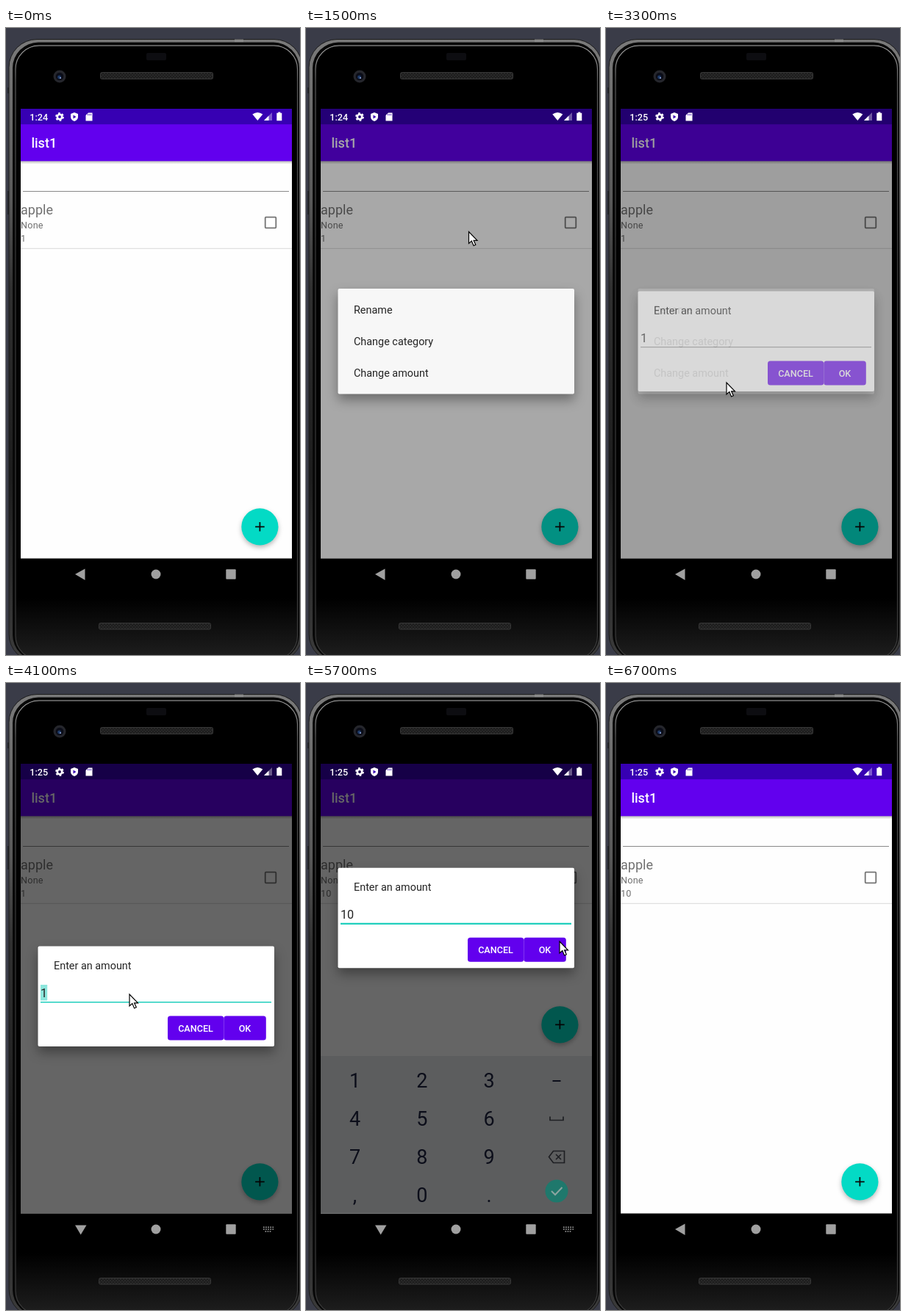
An HTML page for the animation above (7100 ms loop, 400 by 854 pixels).

```html
<!DOCTYPE html>
<html lang="en">
<head>
<meta charset="utf-8">
<title>Shopping list</title>
<style>
html, body { margin: 0; width: 100%; height: 100%; overflow: hidden; background: #3a3c48; }
svg { display: block; width: 400px; height: 854px; font-family: Roboto, sans-serif; }
.medium { font-weight: 500; }
.small { font-size: 12.6px; }
.body { font-size: 14.4px; fill: #242424; }
.card { filter: drop-shadow(0 8px 8px rgba(0,0,0,.36)); }
</style>
</head>
<body>
<svg viewBox="0 0 400 854">
  <defs>
    <linearGradient id="rim" x1="0" x2="0" y1="0" y2="1">
      <stop offset="0" stop-color="#7a7a7a"/><stop offset=".26" stop-color="#585858"/>
      <stop offset=".4" stop-color="#303030"/><stop offset=".7" stop-color="#1c1c1c"/><stop offset="1" stop-color="#3c3c3c"/>
    </linearGradient>
    <linearGradient id="edge" x1="0" x2="0" y1="0" y2="1">
      <stop offset="0" stop-color="#b0b0b0"/><stop offset=".06" stop-color="#5a5a5a"/>
      <stop offset=".35" stop-color="#3a3a3a"/><stop offset="1" stop-color="#3a3a3a"/>
    </linearGradient>
    <linearGradient id="glass" x1="0" x2="0" y1="0" y2="1">
      <stop offset=".9" stop-color="#000"/><stop offset="1" stop-color="#1f1f1f"/>
    </linearGradient>
    <linearGradient id="barShadow" x1="0" x2="0" y1="0" y2="1">
      <stop offset="0" stop-opacity=".28"/><stop offset="1" stop-opacity="0"/>
    </linearGradient>
    <pattern id="mesh" width="4" height="4" patternUnits="userSpaceOnUse">
      <rect width="4" height="4" fill="#1d1d1d"/><path d="M0 0L4 4M4 0L0 4" stroke="#2c2c2c" stroke-width=".8"/>
    </pattern>
    <clipPath id="screen"><rect x="20" y="110" width="369" height="612.6"/></clipPath>
    <clipPath id="rowClip"><rect x="20" y="230" width="369" height="70.5"/></clipPath>
  </defs>

  <!-- phone body -->
  <rect width="400" height="854" fill="#3a3c48"/>
  <path d="M2 81h6v8H2zM2 245h6v9H2zM2 222h3v24H2z" fill="#25262c"/>
  <rect x="4" y="15.5" width="399" height="848" rx="38" fill="url(#rim)" stroke="#1c1c1c"/>
  <path d="M311 15.5h12v4h-12z" fill="#8a8a8a"/>
  <rect x="9" y="19.5" width="390" height="842" rx="35" fill="#080808"/>
  <rect x="13" y="24" width="383.5" height="836" rx="32" fill="url(#glass)" stroke="url(#edge)" stroke-width="1.2"/>
  <rect x="191" y="34" width="27" height="10" rx="2" fill="#0d0d11"/>
  <circle cx="73" cy="66" r="8.5" fill="#25262c"/>
  <circle cx="73" cy="66" r="5.3" fill="#0b0d18"/>
  <circle cx="72.5" cy="67" r="2.4" fill="#1e3a68"/>
  <circle cx="74" cy="68" r="1.1" fill="#8fa6d8"/>
  <g fill="url(#mesh)" stroke="#383838">
    <rect x="128.5" y="60.5" width="153" height="9" rx="2"/>
    <rect x="126.5" y="810.5" width="152" height="8.5" rx="2"/>
  </g>

  <g clip-path="url(#screen)">
    <rect x="20" y="110" width="369" height="613" fill="#fefefe"/>
    <rect x="20" y="181" width="369" height="4.5" fill="url(#barShadow)"/>
    <rect x="20" y="131" width="369" height="50.3" fill="#6200ee"/>
    <rect x="20" y="110" width="369" height="21.2" fill="#3700b3"/>
    <text x="34.4" y="163.3" class="medium" font-size="18" fill="#fff">list1</text>
    <path d="M23 222.5H385" stroke="#898989"/>

    <g clip-path="url(#rowClip)"><circle id="ripple" cx="222" cy="278" fill="#dedede"/></g>
    <g fill="#707070">
      <text x="20" y="254" font-size="18">apple</text>
      <g class="small" letter-spacing=".23"><text x="20" y="273">None</text><text id="amount" x="20" y="291"></text></g>
    </g>
    <rect x="352.7" y="257.7" width="14.6" height="14.6" rx="1" fill="none" stroke="#747474" stroke-width="1.8"/>
    <path d="M20 300.3H389" stroke="#d9d9d9"/>

    <g id="fab">
      <circle cx="345.4" cy="679.4" r="25.1" fill="#03dac5" style="filter:drop-shadow(0 3px 3px rgba(0,0,0,.28))"/>
      <path d="M339.1 679.3h12.6M345.4 673v12.6" stroke="#0a0a0a" stroke-width="1.8"/>
    </g>
    <rect id="dim" x="20" y="110" width="369" height="613"/>

    <!-- status icons -->
    <g fill="#fff">
      <text id="clock" x="32.3" y="125.7" class="medium small"></text>
      <circle cx="73" cy="121" r="3.2" fill="none" stroke="#fff" stroke-width="2.6"/>
      <circle cx="73" cy="121" r="5" fill="none" stroke="#fff" stroke-width="1.8" stroke-dasharray="2.7 2.536"/>
      <path d="M93 115l5 2v4q0 4-5 6q-5-2-5-6v-4z"/>
      <path d="M91.5 118.5v5l4-2.5z" fill="#3700b3"/>
      <path d="M112 115.5h5.5v11h-9v-7.5z"/>
      <path d="M111.5 117v2.2M113.5 117v2.2M115.5 117v2.2" stroke="#3700b3" stroke-width=".8"/>
      <path d="M335.3 117.5q7-5 14 0l-7 8.5z"/>
      <path d="M362 115v11h-11z" opacity=".35"/><path d="M357.5 119.5v6.5H351z"/>
      <path d="M370.3 114.5h3v1.3h2v10.5h-7v-10.5h2z"/>
    </g>

    <g id="menu">
      <rect class="card" x="43.5" y="355" width="321.5" height="143.5" rx="2" fill="#f7f7f7"/>
      <rect id="choice" x="43.5" y="448.5" width="321.5" height="43" fill="#dedede"/>
      <g class="body"><text x="65" y="389">Rename</text><text x="65" y="432">Change category</text><text x="65" y="475">Change amount</text></g>
    </g>

    <g id="prompt">
      <rect class="card" x="43.5" y="358.5" width="321.5" height="136.5" rx="2" fill="#fff"/>
      <text x="65" y="390" class="body">Enter an amount</text>
      <rect id="selection" x="47" y="411" width="9.2" height="21.5" fill="#8de7dd"/>
      <text id="entry" x="47" y="427.5" font-size="16.2" fill="#242424"></text>
      <path id="underline" d="M47 434.7H361"/>
      <g fill="#6200ee"><rect x="220" y="453.5" width="76.3" height="33" rx="3.5"/><rect x="296.3" y="453.5" width="57.5" height="33" rx="3.5"/></g>
      <g class="medium small" fill="#fff" text-anchor="middle"><text x="258" y="474.6">CANCEL</text><text x="325" y="474.6">OK</text></g>
    </g>

    <g id="keyboard">
      <rect x="20" y="508" width="369" height="215" fill="#e8eaed"/>
      <g id="keys" font-size="27" fill="#1d2240" text-anchor="middle"></g>
      <g fill="none" stroke="#4b4e58" stroke-width="1.7">
        <path d="M335.5 542h11" stroke="#1d2240" stroke-width="2.2"/>
        <path d="M332 590.5v5h18v-5"/>
        <path d="M330.5 645.5l6-8h15v16h-15zM340 642l7 7M347 642l-7 7"/>
      </g>
      <rect id="keyShade" x="20" y="508" width="369" height="215"/>
      <circle id="done" cx="341" cy="692" r="15.5"/>
      <path id="tick" d="M334 692l5 5 9.5-10" fill="none" stroke-width="2"/>
    </g>
  </g>

  <!-- navigation bar -->
  <g fill="#a0a0a0">
    <path id="back"/>
    <circle cx="204" cy="744" r="6.5"/><rect x="299.3" y="737.3" width="13.4" height="13.4" rx="1"/>
    <path id="switcher" d="M350 741.2h14M350 744h14M352.5 747h9" stroke="#a2a2a2" stroke-width="1.6" stroke-dasharray="1.7 1.4"/>
  </g>
  <path id="cursor" d="M0 0V16L3.8 12.6 6.6 19 9.3 17.8 6.6 11.8H11.5Z" fill="#fff" stroke="#000" stroke-width="1.2"/>
</svg>

<script>
const LOOP = 7100, STEP = 100;
const el = Object.fromEntries([...document.querySelectorAll('svg [id]')].map(node => [node.id, node]));
const set = (node, attrs) => { for (const key in attrs) node.setAttribute(key, attrs[key]); };
const show = (node, visible) => set(node, { visibility: visible ? 'visible' : 'hidden' });
const shift = (node, x, y) => set(node, { transform: `translate(${x} ${y})` });

// Linear interpolation through [time, value] stops.
function track(t, ...stops) {
  if (t <= stops[0][0]) return stops[0][1];
  for (let i = 1; i < stops.length; i++) {
    const [t0, a] = stops[i - 1], [t1, b] = stops[i];
    if (t <= t1) return a + (b - a) * (t - t0) / (t1 - t0);
  }
  return stops[stops.length - 1][1];
}

const pointer = [
  [100, 392, 836], [600, 221.5, 277.5], [1500, 221.5, 277.5], [1700, 170, 403], [2300, 170, 403],
  [2700, 164, 483], [3300, 164, 483], [3700, 168, 424], [4500, 168, 424], [4700, 66, 540],
  [4850, 66, 540], [5000, 158, 694], [5150, 158, 694], [5400, 345, 352], [5700, 345, 352], [6000, 402, 500]
];

['123', '456', '789', ',0.'].forEach((row, r) => [...row].forEach((label, c) => {
  const key = document.createElementNS('http://www.w3.org/2000/svg', 'text');
  set(key, { x: 66.5 + c * 91.3, y: 551 + r * 52 });
  key.textContent = label;
  el.keys.append(key);
}));

function draw(t) {
  const focused = t >= 4100, typed = t >= 4800, confirmed = t >= 5600;
  const imeOpen = t >= 4100 && t < 5900;

  el.clock.textContent = t < 2700 ? '1:24' : '1:25';
  el.amount.textContent = confirmed ? '10' : '1';
  el.entry.textContent = t >= 5100 ? '10' : '1';

  set(el.ripple, { r: track(t, [700, 0], [1100, 215]), opacity: track(t, [1300, 1], [1500, 0]) });
  set(el.dim, { opacity: track(t, [1300, 0], [1500, .34], [3200, .34], [3300, .38], [3500, .6], [5700, .6], [5900, 0]) });
  set(el.menu, { opacity: track(t, [1300, 0], [1500, 1], [3100, 1], [3300, .2], [3400, 0]) });
  show(el.choice, t >= 2800 && t < 3200);

  set(el.prompt, { opacity: track(t, [3200, 0], [3300, .52], [3500, 1], [5700, 1], [5900, 0]) });
  shift(el.prompt, 0, track(t, [4200, 0], [4500, -106.8]));
  show(el.selection, focused && !typed);
  set(el.underline, focused
    ? { stroke: '#20cfbd', 'stroke-width': typed ? 2.2 : 1.6 }
    : { stroke: '#858585', 'stroke-width': 1 });

  // Once the prompt is confirmed the keyboard belongs to the dimmed list below it.
  const shaded = t >= 5700;
  shift(el.keyboard, 0, track(t, [4100, 215], [4500, 0], [5800, 0], [6000, 215]));
  set(el.keyShade, { opacity: shaded ? track(t, [5700, .6], [5900, 0]) : 0 });
  set(el.done, { fill: shaded ? '#1f786c' : '#12a592' });
  set(el.tick, { stroke: shaded ? '#8ba5a1' : '#fff' });
  shift(el.fab, 0, shaded ? track(t, [5800, -214], [6000, 0]) : 0);

  set(el.back, { d: imeOpen ? 'M94 738.5h15.5L101.7 751.5z' : 'M94 744l13.5-7.5v15.5z' });
  show(el.switcher, imeOpen);

  show(el.cursor, t >= 100 && t < 6000);
  shift(el.cursor, track(t, ...pointer.map(p => [p[0], p[1]])), track(t, ...pointer.map(p => [p[0], p[2]])));
}

const start = performance.now();
function tick() {
  const t = (performance.now() - start) % LOOP;
  draw(Math.floor(t / STEP) * STEP);
  requestAnimationFrame(tick);
}
tick();
</script>
</body>
</html>
```
